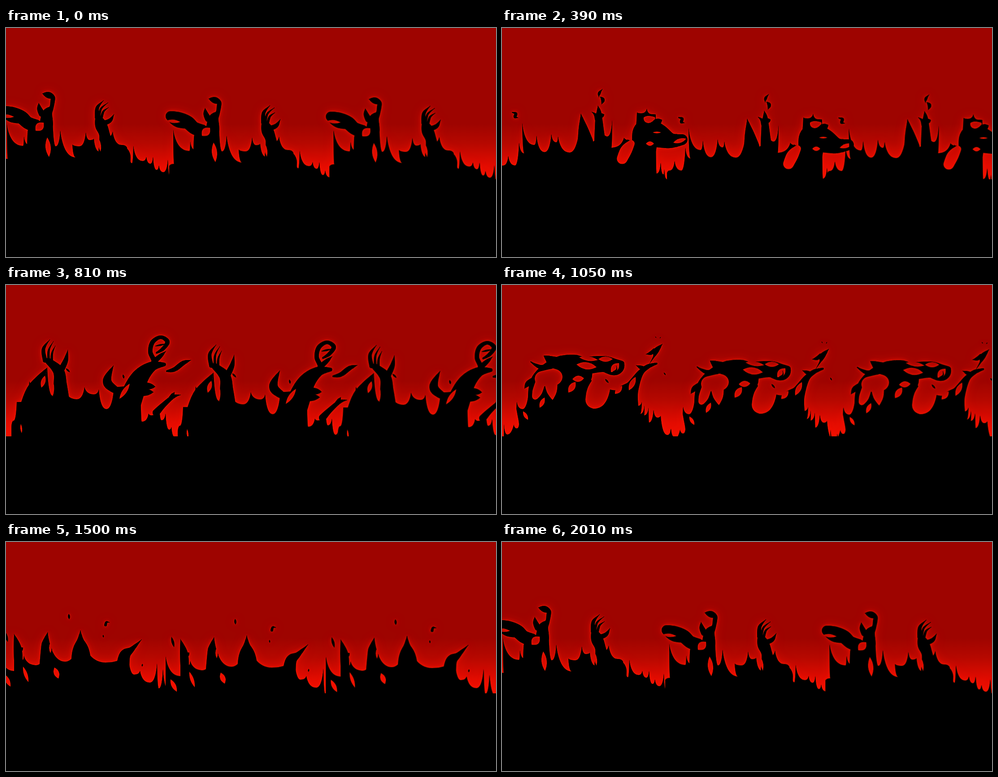
Recreate the animation shown at these times as an HTML page with a canvas. Size 1093 by 513 pixels, loop 2040 ms.

```html
<!DOCTYPE html>
<html lang="en">
<head>
<meta charset="utf-8">
<title>Burning figures</title>
<style>
html, body { margin: 0; width: 100%; height: 100%; overflow: hidden; background: #9e0400; }
canvas { display: block; width: 100vw; height: 100vh; }
</style>
</head>
<body>
<canvas id="stage" width="1093" height="513"></canvas>
<script>
const LOOP = 2040, STEP = 30, FLOOR = 339, WIDTH = 1093, HEIGHT = 513;
const TILE = { x: -30, y: 100, w: 470, h: 240 };
const OFFSETS = [[0, 0], [371, 11.5], [728.5, 12.5]];

const clamp = (v, lo, hi) => Math.max(lo, Math.min(hi, v));
const mix = (a, b, u) => a + (b - a) * u;

function newCanvas(w, h) {
  const canvas = document.createElement('canvas');
  canvas.width = w;
  canvas.height = h;
  return canvas.getContext('2d', { willReadFrequently: true });
}

const pen = newCanvas(TILE.w, TILE.h);
pen.translate(-TILE.x, -TILE.y);
const ink = () => { pen.globalCompositeOperation = 'source-over'; };
const cut = () => { pen.globalCompositeOperation = 'destination-out'; };

function groups(values, size) {
  return Array.from({ length: values.length / size }, (_, i) => values.slice(i * size, (i + 1) * size));
}

// Flame front: sharp tips alternate with round valleys.
function ridge(...values) {
  const pts = groups(values, 2), last = pts.length - 1;
  pen.beginPath();
  pen.moveTo(pts[0][0], 345);
  pen.lineTo(...pts[0]);
  for (let i = 0; i < last; i++) {
    const [x, y] = pts[i], [nx, ny] = pts[i + 1];
    const [tip, low] = i % 2 ? [pts[i + 1], pts[i]] : [pts[i], pts[i + 1]];
    const steep = [mix(tip[0], low[0], 0.12), mix(tip[1], low[1], 0.55)];
    const round = [mix(tip[0], low[0], 0.4), low[1]];
    const [a, b] = i % 2 ? [round, steep] : [steep, round];
    pen.bezierCurveTo(...a, ...b, nx, ny);
  }
  pen.lineTo(pts[last][0], 345);
  pen.fill();
}

// Smooth chain of discs through x, y, radius triples.
function bone(...values) {
  const pts = groups(values, 3), at = i => pts[clamp(i, 0, pts.length - 1)];
  pen.beginPath();
  for (let i = 0; i < pts.length - 1; i++) {
    for (let t = 0; t <= 1; t += 1 / 40) {
      const [x, y, r] = [0, 1, 2].map(k => {
        const p = at(i - 1)[k], a = at(i)[k], b = at(i + 1)[k], q = at(i + 2)[k];
        return a + t / 2 * (b - p + t * (2 * p - 5 * a + 4 * b - q + t * (3 * (a - b) + q - p)));
      });
      const size = Math.max(0.4, r);
      pen.moveTo(x + size, y);
      pen.arc(x, y, size, 0, 7);
    }
  }
  pen.fill();
}

// Curved claw, thick at the root; a positive bend bows to its left.
function claw(x, y, tipX, tipY, r, bend = 0) {
  const dx = tipX - x, dy = tipY - y, k = bend / Math.hypot(dx, dy);
  bone(x, y, r, x + dx / 2 + dy * k, y + dy / 2 - dx * k, r * 0.75, tipX, tipY, 0);
}

function leaf(x1, y1, x2, y2, r) {
  const nx = y2 - y1, ny = x1 - x2, k = 2 * r / Math.hypot(nx, ny);
  const mx = (x1 + x2) / 2, my = (y1 + y2) / 2;
  pen.beginPath();
  pen.moveTo(x1, y1);
  pen.quadraticCurveTo(mx + nx * k, my + ny * k, x2, y2);
  pen.quadraticCurveTo(mx - nx * k, my - ny * k, x1, y1);
  pen.fill();
}

function spark(x, y, r = 2) {
  const turn = x * y;
  leaf(x - r * 1.5 * Math.cos(turn), y - r * 1.5, x + r * 1.5 * Math.cos(turn), y + r * 1.5, r * 0.7);
}

function raisedArms() {
  ridge(-7, 298, 4, 293, 2, 217, 38, 264, 40, 243, 52, 262, 60, 212, 80, 215, 104, 200, 111, 265,
    121, 230, 156, 290, 148, 261, 164, 265, 178, 234, 187, 251, 196, 248, 209, 277,
    212, 235, 225, 245, 238, 232, 258, 262, 270, 268, 281, 303);
  ridge(276, 290, 281, 303, 284, 264, 305, 298, 313, 289, 322, 304, 328, 289,
    336, 318, 341, 308, 351, 323, 361, 295, 367, 334);
  bone(76, 335, 32, 76, 235, 28);
  bone(246, 335, 30, 250, 289, 28);
  bone(-4, 186, 11, 14, 194, 17, 34, 200, 15, 48, 212, 14, 66, 220, 15);
  bone(90, 215, 15, 92, 192, 11, 101, 179, 5, 104, 164, 5, 104, 155, 5, 94, 150, 7, 81, 147, 0);
  claw(80, 192, 73, 168, 7, 2);
  bone(224, 280, 18, 220, 240, 12, 212, 218, 13, 206, 202, 7);
  claw(203, 200, 218, 162, 5, 7);
  claw(207, 200, 228, 167, 3, 6);
  claw(213, 200, 229, 178, 3, 4);
  claw(216, 214, 241, 193, 6, -5);
  cut();
  leaf(66, 230, 84, 212, 9);
  leaf(92, 245, 96, 289, 6);
  leaf(-14, 196, 18, 199, 4);
  leaf(207, 248, 211, 277, 3);
}

function crouchingBeast() {
  ridge(-3, 314, 3, 308, 14, 287, 29, 308, 38, 257, 50, 281, 45, 213, 72, 262, 77, 241, 95, 278,
    110, 238, 121, 256, 125, 243, 151, 279, 176, 192, 204, 254, 214, 174, 235, 243,
    246, 206, 244, 268, 272, 246, 290, 252);
  ridge(280, 249, 290, 252, 301, 189, 311, 191, 323, 181, 334, 193, 343, 194, 345, 326,
    354, 302, 360, 328, 362, 316, 367, 338);
  bone(186, 255, 17, 181, 225, 10, 176, 192, 0);
  bone(218, 250, 12, 216, 205, 8, 216, 188, 5, 214, 174, 0);
  claw(211, 204, 200, 188, 4, -3);
  claw(217, 198, 228, 194, 6);
  bone(318, 270, 26, 322, 235, 30, 345, 240, 27, 375, 252, 17, 402, 250, 12);
  claw(340, 214, 357, 206, 9);
  bone(224, 137, 0, 217, 146, 3, 216, 155, 0);
  bone(219, 154, 0, 225, 161, 4, 222, 171, 0);
  bone(23, 189, 1, 31, 192, 3, 29, 199, 3, 36, 201, 0);
  cut();
  bone(288, 259, 8, 277, 274, 13, 268, 293, 12);
  bone(317, 201, 1, 326, 205, 8, 339, 202, 3);
  leaf(382, 257, 411, 248, 5);
  leaf(336, 234, 355, 234, 2);
  leaf(321, 259, 339, 259, 5);
}

function antlers() {
  ridge(-2, 312, 11, 334, 42, 222, 50, 291, 64, 284, 79, 295, 84, 257, 94, 262, 117, 178, 149, 238,
    177, 168, 202, 263, 215, 242, 222, 250, 242, 226, 248, 240, 290, 220, 322, 280);
  ridge(308, 262, 322, 280, 350, 264, 346, 311, 352, 299, 365, 332, 376, 321, 386, 340);
  bone(27, 340, 16, 26, 290, 13, 32, 250, 8, 42, 222, 0);
  bone(122, 275, 24, 126, 222, 19, 119, 200, 12, 117, 178, 0);
  bone(180, 270, 22, 180, 226, 19, 177, 195, 6, 177, 168, 0);
  bone(268, 285, 32, 288, 243, 21, 301, 215, 15, 301, 199, 12);
  claw(290, 195, 274, 172, 7, -4);
  claw(314, 198, 334, 160, 6, -6);
  claw(318, 199, 345, 166, 6, -6);
  claw(318, 190, 309, 172, 4, -2);
  claw(302, 213, 323, 206, 8);
  claw(304, 226, 330, 225, 8);
  claw(304, 238, 338, 242, 10);
  bone(338, 287, 9, 358, 262, 10, 380, 246, 8, 402, 240, 1);
  claw(378, 250, 391, 268, 7);
  spark(210, 176);
  spark(219, 195, 3);
  spark(221, 211);
  spark(341, 217, 3);
  cut();
  leaf(265, 263, 253, 288, 4);
  leaf(309, 253, 289, 268, 4);
}

function reachingBody() {
  ridge(12, 318, 17, 304, 24, 262, 38, 262, 52, 216, 68, 225, 92, 185, 104, 248, 118, 200, 158, 256,
    175, 229, 196, 245, 207, 234, 224, 278, 241, 228, 252, 228, 300, 190, 303, 306);
  ridge(298, 300, 304, 306, 318, 288, 325, 292, 342, 270, 347, 303, 356, 288, 364, 324, 369, 318, 376, 340);
  bone(56, 305, 34, 63, 245, 21, 76, 213, 11, 92, 185, 0);
  bone(122, 275, 22, 121, 225, 15, 117, 193, 12, 94, 170, 7);
  claw(87, 169, 98, 122, 5, 9);
  claw(95, 168, 106, 126, 3, 5);
  claw(102, 170, 110, 136, 3, 3);
  claw(123, 190, 138, 145, 7, -3);
  bone(245, 236, 8, 228, 222, 10, 227, 207, 8, 240, 180, 0);
  bone(265, 290, 28, 282, 245, 25, 299, 207, 19, 325, 183, 11, 353, 178, 4);
  bone(318, 190, 10, 330, 172, 6, 322, 150, 5, 327, 128, 5, 345, 117, 4, 360, 127, 5, 350, 143, 4, 336, 152, 2);
  claw(333, 169, 357, 148, 6);
  leaf(332, 137, 356, 132, 2);
  claw(312, 226, 333, 228, 8);
  claw(304, 240, 329, 240, 9);
  bone(359, 193, 2, 376, 189, 5, 395, 175, 5, 413, 168, 0);
  bone(335, 286, 8, 350, 270, 6, 372, 251, 4, 390, 246, 0);
  claw(368, 253, 376, 240, 5);
  spark(138, 191, 3);
  spark(262, 205, 3);
  cut();
  leaf(276, 221, 253, 255, 5);
  leaf(105, 216, 104, 250, 3);
  leaf(87, 203, 79, 230, 5);
  leaf(33, 311, 35, 332, 2);
}

function leapingBeast() {
  ridge(4, 312, 12, 335, 33, 262, 46, 278, 62, 212, 95, 250, 150, 205, 206, 277,
    241, 234, 264, 236, 300, 214, 302, 271);
  ridge(296, 265, 302, 271, 312, 262, 308, 289, 318, 270, 317, 292, 327, 275, 328, 308,
    338, 280, 347, 297, 354, 293, 369, 336, 377, 322, 384, 340);
  bone(88, 295, 30, 83, 235, 24, 95, 208, 24, 130, 190, 30, 160, 198, 42);
  bone(150, 300, 52, 158, 230, 45);
  bone(180, 182, 20, 225, 177, 18, 252, 184, 18, 267, 176, 6);
  bone(125, 182, 20, 107, 168, 9, 94, 159, 1);
  bone(110, 184, 12, 90, 185, 6, 75, 179, 3, 64, 172, 1);
  claw(70, 215, 50, 232, 8, -3);
  bone(273, 290, 33, 275, 255, 28, 290, 230, 15, 308, 198, 7, 325, 183, 5, 345, 176, 2);
  bone(328, 178, 0, 339, 160, 2, 344, 147, 6, 358, 132, 0);
  claw(340, 147, 321, 155, 5, 2);
  claw(318, 188, 299, 180, 5);
  spark(343, 117, 1);
  spark(353, 118, 1);
  spark(363, 199);
  cut();
  bone(222, 213, 17, 214, 238, 24, 206, 257, 20);
  bone(90, 210, 17, 112, 207, 19, 118, 206, 17);
  bone(85, 220, 11, 79, 238, 11, 74, 250, 7);
  claw(109, 215, 113, 258, 15);
  leaf(164, 217, 148, 241, 7);
  leaf(157, 211, 183, 209, 7);
  leaf(166, 178, 211, 184, 8);
  leaf(215, 166, 247, 166, 6);
  leaf(172, 162, 214, 168, 5);
  leaf(95, 252, 84, 275, 5);
  bone(29, 262, 0, 30, 288, 4, 32, 312, 6, 33, 320, 1);
  leaf(47, 283, 58, 302, 4);
  leaf(298, 206, 283, 236, 6);
  leaf(268, 226, 252, 244, 6);
  leaf(243, 195, 261, 175, 8);
  ink();
  claw(249, 195, 255, 181, 2, -4);
  spark(234, 215, 3);
}

function lowFlames() {
  ridge(-15, 245, 18, 289, 18, 206, 37, 264, 40, 255, 68, 276, 93, 202, 132, 268, 166, 198, 222, 270,
    272, 246, 286, 297, 299, 289, 321, 315, 337, 272, 341, 328, 350, 285, 367, 336);
  bone(28, 285, 9, 26, 240, 9, 18, 206, 0);
  claw(28, 244, 38, 237, 6);
  bone(92, 285, 18, 90, 240, 12, 88, 225, 7, 93, 202, 0);
  bone(168, 285, 24, 167, 247, 19, 166, 220, 7, 166, 198, 0);
  bone(260, 285, 15, 265, 254, 12, 280, 241, 6, 303, 218, 0);
  leaf(-2, 201, 4, 224, 3);
  leaf(140, 161, 141, 173, 2.5);
  claw(222, 186, 231, 180, 3, 4);
  spark(217, 211);
  spark(304, 276);
  cut();
  leaf(38, 279, 50, 314, 4);
  leaf(108, 281, 117, 306, 6);
  leaf(99, 225, 99, 249, 3);
  leaf(-4, 296, 10, 324, 5);
}

// Two-pass distance to the nearest pixel where isZero holds.
function distances(isZero) {
  const { w, h } = TILE, d = new Float32Array(w * h);
  for (let i = 0; i < d.length; i++) d[i] = isZero(i) ? 0 : 999;
  const sweep = (from, to, dir) => {
    for (let i = from; i !== to; i += dir) {
      const x = i % w, row = i - dir * w;
      const relax = (k, cost) => { if (k >= 0 && k < d.length) d[i] = Math.min(d[i], d[k] + cost); };
      if (x > 0 && x < w - 1) {
        relax(i - dir, 1);
        relax(row - 1, 1.414);
        relax(row + 1, 1.414);
      }
      relax(row, 1);
    }
  };
  sweep(0, d.length, 1);
  sweep(d.length - 1, -1, -1);
  return d;
}

// Signed distance, positive inside the silhouette.
function field(paint) {
  const { x, y, w, h } = TILE;
  ink();
  pen.clearRect(x, y, w, h);
  paint();
  const data = pen.getImageData(0, 0, w, h).data, alpha = i => data[i * 4 + 3];
  const inner = distances(i => alpha(i) < 128), outer = distances(i => alpha(i) >= 128);
  return inner.map((d, i) => {
    const a = alpha(i);
    return a > 0 && a < 255 ? a / 255 - 0.5 : clamp(d - outer[i], -12, 15);
  });
}

const keys = [[0, raisedArms], [390, crouchingBeast], [600, antlers], [810, reachingBody],
  [1050, leapingBeast], [1500, lowFlames]].map(([at, paint]) => ({ at, field: field(paint) }));
keys.push({ at: LOOP - STEP, field: keys[0].field });

const ctx = document.getElementById('stage').getContext('2d');
const tile = newCanvas(TILE.w, TILE.h);
const scene = newCanvas(WIDTH, HEIGHT);
const pixels = tile.createImageData(TILE.w, TILE.h);

const sky = ctx.createLinearGradient(0, 215, 0, FLOOR);
sky.addColorStop(0, '#9e0400');
sky.addColorStop(0.35, '#b60800');
sky.addColorStop(0.75, '#e20c00');
sky.addColorStop(1, '#f01000');

// One silhouette rises and dissolves while the next climbs from below.
function shapeTile(a, b, u, time) {
  const { w, h } = TILE, swell = Math.sin(Math.PI * u);
  const up = Math.round(22 * u), down = Math.round(22 * (1 - u));
  const lift = Array.from({ length: w }, (_, x) =>
    Math.round(swell * 24 * (1 - Math.abs(Math.sin(x / 17 + time / 260))) ** 2));
  for (let y = 0; y < h; y++) {
    const sway = Math.round(swell * 5 * Math.sin(y / 15 + time / 75));
    for (let x = 0; x < w; x++) {
      const sx = clamp(x + sway, 0, w - 1), raised = y + lift[sx];
      const ya = clamp(raised + up, 0, h - 1), yb = clamp(raised - down, 0, h - 1);
      const s = mix(a[ya * w + sx], b[yb * w + sx], u);
      pixels.data[(y * w + x) * 4 + 3] = 255 * clamp(s + 0.5, 0, 1);
    }
  }
  tile.putImageData(pixels, 0, 0);
}

function stamp(blur, color) {
  ctx.shadowBlur = blur;
  ctx.shadowColor = color;
  ctx.drawImage(scene.canvas, 0, 0);
}

function draw(time) {
  const i = clamp(keys.findLastIndex(k => k.at <= time), 0, keys.length - 2);
  const a = keys[i], b = keys[i + 1];
  shapeTile(a.field, b.field, (time - a.at) / (b.at - a.at), time);

  scene.clearRect(0, 0, WIDTH, HEIGHT);
  for (const [x, y] of OFFSETS) scene.drawImage(tile.canvas, TILE.x + x, TILE.y + y);
  scene.fillRect(0, FLOOR, WIDTH, HEIGHT - FLOOR);

  ctx.shadowColor = 'transparent';
  ctx.fillStyle = sky;
  ctx.fillRect(0, 0, WIDTH, HEIGHT);
  stamp(22, 'rgba(255,16,0,.45)');
  stamp(9, 'rgba(255,20,0,.75)');
  stamp(3, 'rgba(255,40,0,.85)');
}

const start = performance.now();
let shown = -1;
function tick() {
  const time = Math.floor(((performance.now() - start) % LOOP) / STEP) * STEP;
  if (time !== shown) draw(shown = time);
  requestAnimationFrame(tick);
}
tick();
</script>
</body>
</html>
```
